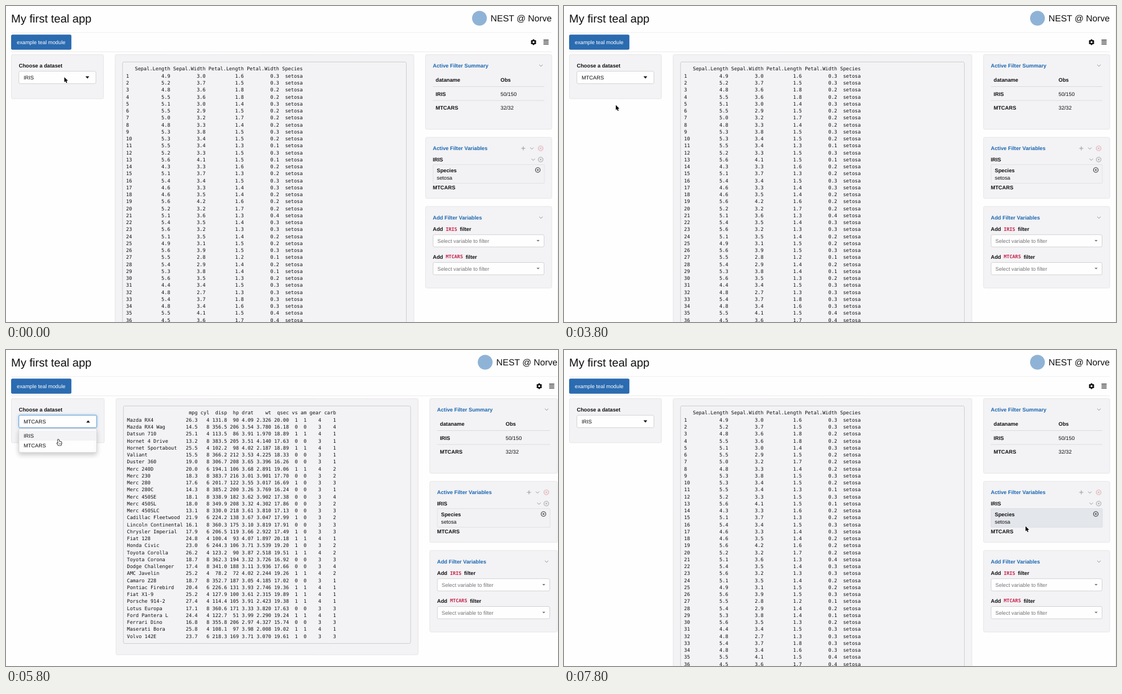
Write an HTML page with a canvas that moves like this. It is 970 px wide and 555 px high and loops after 8000 ms.

```html
<!DOCTYPE html>
<html lang="en">
<head>
<meta charset="utf-8">
<title>My first teal app</title>
<style>
html, body { margin: 0; width: 970px; height: 555px; overflow: hidden; background: #fefefe; }
canvas { display: block; }
</style>
</head>
<body>
<canvas id="stage" width="970" height="555"></canvas>
<script>
const ctx = document.getElementById('stage').getContext('2d');
ctx.textRendering = 'geometricPrecision';

const SANS = '"Liberation Sans", Arial, sans-serif';
const MONO = '"DejaVu Sans Mono", monospace';
const SIZE = 9.26, LINE = 12.257;
const INK = '#101012', PANEL = '#f3f2f4', EDGE = '#e2e1e3', BLUE = '#1b68b3', RED = '#c5224c', GREY = '#93979d';
const LOOP = 8000, STEP = 200;

let seed = 7;
function random() {
  seed = (seed * 16807) % 2147483647;
  return seed / 2147483647;
}
const around = (mid, spread) => mid + spread * (random() + random() - 1);
const cells = (row, widths) => row.map((v, i) => String(v).padStart(widths[i])).join('');

function irisTable() {
  const names = ['Sepal.Length', 'Sepal.Width', 'Petal.Length', 'Petal.Width'];
  const widths = names.map(n => n.length + 1);
  const lines = ['  ' + cells(names, widths) + ' Species'];
  for (let i = 1; i <= 36; i++) {
    const row = [around(5, 0.8), around(3.45, 0.8), around(1.48, 0.4), around(0.25, 0.18)];
    lines.push(String(i).padEnd(2) + cells(row.map(v => v.toFixed(1)), widths) + '  setosa');
  }
  return lines;
}

const cars = ['Mazda RX4', 'Mazda RX4 Wag', 'Datsun 710', 'Hornet 4 Drive', 'Hornet Sportabout', 'Valiant',
  'Duster 360', 'Merc 240D', 'Merc 230', 'Merc 280', 'Merc 280C', 'Merc 450SE', 'Merc 450SL', 'Merc 450SLC',
  'Cadillac Fleetwood', 'Lincoln Continental', 'Chrysler Imperial', 'Fiat 128', 'Honda Civic', 'Toyota Corolla',
  'Toyota Corona', 'Dodge Challenger', 'AMC Javelin', 'Camaro Z28', 'Pontiac Firebird', 'Fiat X1-9',
  'Porsche 914-2', 'Lotus Europa', 'Ford Pantera L', 'Ferrari Dino', 'Maserati Bora', 'Volvo 142E'];

// every measure follows from the number of cylinders
function carRow() {
  const cyl = 4 + 2 * Math.floor(random() * 3);
  const wt = around(0.7 + 0.4 * cyl, 0.7);
  const am = wt < 2.9 ? 1 : 0;
  return [
    around(37 - 2.7 * cyl, 4).toFixed(1), cyl, around(60 * cyl - 130, 50).toFixed(1),
    around(30 * cyl - 40, 40).toFixed(0), around(4.6 - 0.16 * cyl, 0.4).toFixed(2), wt.toFixed(3),
    around(21.5 - 0.55 * cyl, 1.6).toFixed(2), cyl < 8 ? 1 : 0, am, 3 + am, Math.ceil(random() * cyl / 2)
  ];
}

function carTable() {
  const names = ['mpg', 'cyl', 'disp', 'hp', 'drat', 'wt', 'qsec', 'vs', 'am', 'gear', 'carb'];
  const widths = [5, 4, 6, 4, 5, 6, 6, 3, 3, 5, 5];
  const line = (name, row) => name.padEnd(19) + cells(row, widths);
  return [line('', names), ...cars.map(name => line(name, carRow()))];
}

const irisLines = irisTable(), carLines = carTable();

// y is the middle of the capitals
function text(s, x, y, { size = SIZE, bold = false, color = INK, font = SANS } = {}) {
  ctx.font = `${bold ? 'bold ' : ''}${size}px ${font}`;
  ctx.fillStyle = color;
  ctx.fillText(s, x, y + size * 0.36);
}

const label = (s, x, y, color = INK) => text(s, x, y, { bold: true, color });

function box(x, y, x2, y2, fill, edge, r = 2.5) {
  ctx.beginPath();
  ctx.roundRect(x, y, x2 - x, y2 - y, r);
  if (fill) { ctx.fillStyle = fill; ctx.fill(); }
  if (edge) { ctx.strokeStyle = edge; ctx.lineWidth = 0.8; ctx.stroke(); }
}

function path(points, color, width = 1) {
  ctx.beginPath();
  points.forEach(([x, y]) => ctx.lineTo(x, y));
  ctx.strokeStyle = color;
  ctx.lineWidth = width;
  ctx.stroke();
}

function shape(points, fill, edge, width = 1) {
  ctx.beginPath();
  points.forEach(([x, y]) => ctx.lineTo(x, y));
  ctx.closePath();
  ctx.lineJoin = 'round';
  if (edge) { ctx.strokeStyle = edge; ctx.lineWidth = width; ctx.stroke(); }
  ctx.fillStyle = fill;
  ctx.fill();
}

function disc(x, y, r, fill) {
  ctx.beginPath();
  ctx.arc(x, y, r, 0, Math.PI * 2);
  ctx.fillStyle = fill;
  ctx.fill();
}

// draws with a soft shadow below
function shadowed(color, blur, dy, paint) {
  ctx.save();
  ctx.shadowColor = color;
  ctx.shadowBlur = blur;
  ctx.shadowOffsetY = dy;
  paint();
  ctx.restore();
}

const rule = (x, x2, y, color = '#d6d5d8') => path([[x, y], [x2, y]], color, 0.8);
const chevron = (x, y) => path([[x - 3, y - 1.5], [x, y + 1.5], [x + 3, y - 1.5]], GREY);
const triangle = (x, y, w, h, color) => shape([[x - w, y - h], [x + w, y - h], [x, y + h]], color);

function closeIcon(x, y, color) {
  ctx.beginPath();
  ctx.arc(x, y, 4.1, 0, Math.PI * 2);
  ctx.strokeStyle = color;
  ctx.lineWidth = 0.9;
  ctx.stroke();
  path([[x - 1.6, y - 1.6], [x + 1.6, y + 1.6]], color);
  path([[x + 1.6, y - 1.6], [x - 1.6, y + 1.6]], color);
}

function gear(x, y) {
  for (let i = 0; i < 3; i++) {
    const a = Math.PI / 6 + i * Math.PI / 3, c = Math.cos(a) * 5, s = Math.sin(a) * 5;
    path([[x - c, y - s], [x + c, y + s]], INK, 2.6);
  }
  disc(x, y, 4, INK);
  disc(x, y, 1.7, '#fefefe');
}

function header(shift) {
  text('My first teal app', 9, 21.5, { size: 20 });
  disc(832 + shift, 21.5, 13, '#8fb3d6');
  text('NEST @ Norve', 851.5 + shift, 21.6, { size: 15.6 });
  rule(9, 959 + shift, 46.5, '#ececee');
  rule(9, 959 + shift, 80.5, '#e6e6e8');
  box(9, 50.2, 114.9, 76.8, '#2b6bb0');
  text('example teal module', 19, 63.5, { color: '#fff' });
  gear(927 + shift, 63.5);
  for (const y of [60, 63.3, 66.6]) path([[944.5 + shift, y], [953.5 + shift, y]], INK, 1.4);
}

function table(wide) {
  const lines = wide ? carLines : irisLines;
  const left = wide ? 193.3 : 191.8, right = wide ? 724.3 : 716.8;
  box(left, 85.3, right, wide ? 535.3 : 600, PANEL, EDGE);
  box(left + 13, 98.3, right - 13.3, wide ? 515.5 : 600, PANEL, '#c4c3c6');
  lines.forEach((s, i) => text(s, left + 19.2, 110.4 + i * LINE, { size: 8.6, font: MONO }));
}

function rightSide(wide, hover) {
  const l = wide ? 757.5 : 750, r = wide ? 956 : 946, d = wide ? 10 : 0, obs = wide ? 878 : 869;
  const card = (y, y2) => box(l - 12.8, y, 959 + d, y2, PANEL, EDGE);

  card(85.3, 216.5);
  label('Active Filter Summary', l, 104.5, BLUE);
  chevron(940 + d, 104.5);
  label('dataname', l + 5, 129.8);
  label('Obs', obs, 129.8);
  rule(l, r, 141.5);
  label('IRIS', l + 5, 154.2);
  text('50/150', obs, 154.2);
  rule(l, r, 166);
  label('MTCARS', l + 5, 178.6);
  text('32/32', obs, 178.6);

  card(230.7, 338);
  label('Active Filter Variables', l, 250, BLUE);
  const px = 909 + d;
  path([[px - 3.5, 250], [px + 3.5, 250]], GREY);
  path([[px, 246.5], [px, 253.5]], GREY);
  chevron(924 + d, 250);
  closeIcon(939.5 + d, 250, '#d79da3');
  label('IRIS', l, 269.7);
  chevron(926.5 + d, 269.7);
  closeIcon(939.5 + d, 269.7, GREY);
  box(l + 0.5, 278.5, r, 311.3, hover ? '#e3e6ea' : '#f2f1f4', hover ? '#d9dce0' : '#dedde0', 1);
  label('Species', l + 7, 288.3);
  closeIcon(934.5 + d, 288, INK);
  text('setosa', l + 7, 301.5);
  label('MTCARS', l, 318.7);

  card(352, 495.3);
  label('Add Filter Variables', l, 371.5, BLUE);
  chevron(940 + d, 371.5);
  [['IRIS', 391.5], ['MTCARS', 440.3]].forEach(([name, y]) => {
    label('Add', l, y);
    text(name, l + 22.7, y, { size: 8.4, bold: true, color: RED, font: MONO });
    label('filter', l + 27.3 + name.length * 5.06, y);
    box(l + 0.5, y + 10.2, r - 0.5, y + 31.7, '#fefefe', '#c9c9cc');
    text('Select variable to filter', l + 8, y + 21, { color: '#75757a' });
    triangle(935 + d, y + 20.8, 2.7, 1.4, '#75757a');
  });
}

function picker({ open, wide, value, row, caret }) {
  const r = wide ? 159.3 : 158;
  box(9.5, 85.3, wide ? 172.7 : 171.3, 163, PANEL, EDGE);
  label('Choose a dataset', 22.5, 104.5);
  const field = () => box(22.6, 114.6, r, 136.4, '#fefefe', open ? '#4f95d0' : '#c9c9cc');
  if (open) shadowed('rgba(90,165,225,.55)', 4, 0, field);
  field();
  text(value, 31, 125.6);
  triangle(r - 15, 125.5, 3.3, open ? -1.9 : 1.9, INK);
  if (caret) path([[48.5, 120.5], [48.5, 130.5]], INK, 0.8);
  if (!open) return;
  shadowed('rgba(0,0,0,.2)', 8, 4, () => box(22.6, 138.3, r, 180, '#fefefe', '#cfcfd2'));
  ctx.fillStyle = '#f3f2f4';
  ctx.fillRect(23.1, row ? 159.3 : 141.8, r - 23.6, 17.5);
  text('IRIS', 31, 150.8);
  text('MTCARS', 31, 168);
}

// time, x, y of the pointer tip
const track = [
  [0, 102.5, 125], [2600, 103, 125.5], [3600, 91, 174], [4000, 91, 174],
  [4800, 92, 126], [5200, 92, 126], [5800, 92.5, 157.5], [6200, 92, 158],
  [7000, 740, 478], [7600, 811, 311], [LOOP, 811, 308]
];

function pointerAt(t) {
  const i = track.findIndex(k => k[0] > t);
  const [t0, x0, y0] = track[i - 1], [t1, x1, y1] = track[i];
  const u = (t - t0) / (t1 - t0), e = u * u * (3 - 2 * u);
  return [x0 + (x1 - x0) * e, y0 + (y1 - y0) * e];
}

function drawArrow() {
  shape([[0, 0], [0, 8.8], [2, 7], [3.5, 10.3], [5, 9.6], [3.6, 6.5], [6.3, 6.3]], '#000', '#fff', 1.5);
}

function drawBeam() {
  for (const [c, w] of [['#fff', 2.2], ['#111', 1]]) {
    path([[0, -4.5], [0, 4.5]], c, w);
    for (const d of [-1, 1]) path([[-2.5, 5.3 * d], [0, 4.5 * d], [2.5, 5.3 * d]], c, w);
    path([[-1.2, 0.8], [1.2, 0.8]], c, w);
  }
}

function drawHand() {
  shape([[-1.6, 0.4], [-0.6, -0.4], [0.4, 0.4], [0.9, 3.2], [2, 3], [3.5, 3.5],
    [5, 4.4], [5.2, 7], [4, 10], [-0.4, 10], [-2.8, 6.6], [-2.4, 5.7], [-0.7, 6.4]], '#fff', '#111', 1.6);
  for (const x of [1, 2.5, 4]) path([[x, 6], [x, 8.2]], '#333', 0.6);
}

function draw(t) {
  const between = (a, b) => t >= a && t < b;
  const [x, y] = pointerAt(t);
  const open = between(1000, 3800) || between(5000, 6000);
  const wide = between(4000, 6000);
  const value = between(3800, 6000) ? 'MTCARS' : 'IRIS';
  const inside = x > 22 && x < 158;
  const inList = open && inside && y > 140;
  const row = inList ? y > 160 : value === 'MTCARS';
  const caret = between(1000, 2000) || between(2200, 3800);

  ctx.fillStyle = '#fefefe';
  ctx.fillRect(0, 0, 970, 555);
  if (!wide) path([[969.5, 0], [969.5, 555]], '#ededef');
  header(wide ? 10 : 0);
  table(wide);
  rightSide(wide, t >= 7600);
  picker({ open, wide, value, row, caret });

  ctx.save();
  ctx.translate(x, y);
  if (inList) drawHand();
  else if (t >= STEP && inside && y > 114 && y < 136) drawBeam();
  else drawArrow();
  ctx.restore();
}

const start = performance.now();
function tick() {
  const t = (performance.now() - start) % LOOP;
  draw(Math.floor(t / STEP) * STEP);
  requestAnimationFrame(tick);
}
tick();
</script>
</body>
</html>
```
